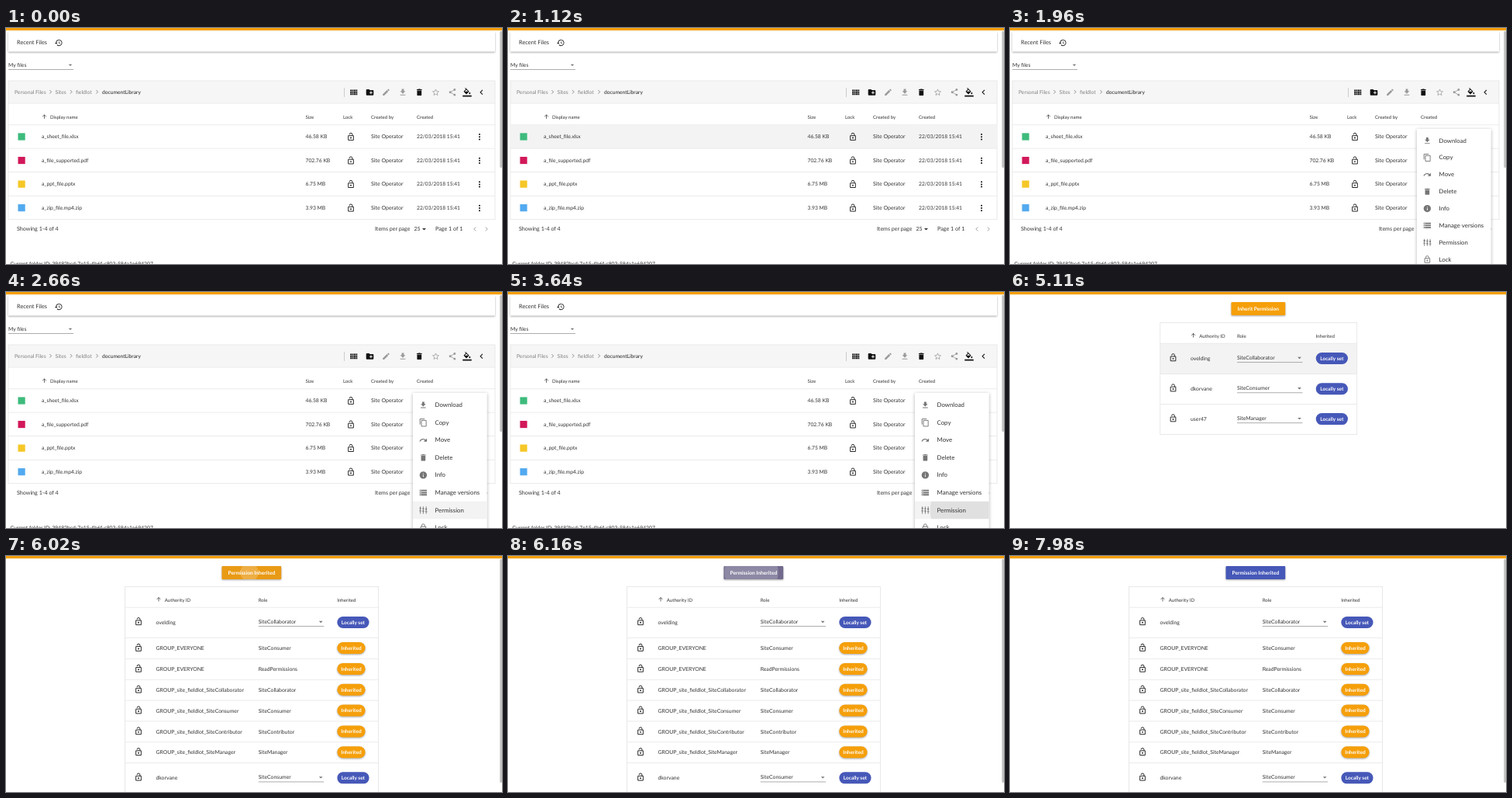
An HTML page for the animation above (8 s loop, 640x304 px).

```html
<!DOCTYPE html>
<html lang="en">
<head>
<meta charset="utf-8">
<title>File permissions</title>
<style>
html, body { margin: 0; width: 100%; height: 100%; overflow: hidden; background: #fff; }
svg { display: block; width: 100%; height: 100%; }
text { font-family: Lato, "Open Sans", sans-serif; text-rendering: geometricPrecision; white-space: pre; }
.raised { filter: drop-shadow(0 1px 1px rgba(0,0,0,.35)); }
.sheet { filter: drop-shadow(0 1px 2px rgba(0,0,0,.3)); }
</style>
</head>
<body>
<svg id="stage" viewBox="0 0 640 304"></svg>
<script>
const LOOP = 8000;
const INK = '#333', SOFT = '#757575', DIM = '#9a9a9a', LINE = '#e6e6e6';
const ORANGE = [245, 159, 10], BLUE = [70, 88, 184];
const rgb = c => `rgb(${c.map(Math.round)})`;

// Icons on a 24 unit grid: f = filled path, s = stroked path
const icons = {
  grid: { f: [5, 10, 15].map(y => [3, 8, 13, 18].map(x => `M${x} ${y}h4v4h-4z`).join('')).join('') },
  folder: { f: 'M20 6h-8l-2-2H4a2 2 0 0 0-2 2v12a2 2 0 0 0 2 2h16a2 2 0 0 0 2-2V8a2 2 0 0 0-2-2zm-1 8h-3v3h-2v-3h-3v-2h3V9h2v3h3z' },
  pencil: { f: 'M3 17.2V21h3.8L17.8 9.9l-3.7-3.7zM20.7 7a1 1 0 0 0 0-1.4l-2.3-2.3a1 1 0 0 0-1.4 0l-1.9 1.8 3.8 3.8z' },
  download: { f: 'M19 9h-4V3H9v6H5l7 7zM5 18v2h14v-2z' },
  bin: { f: 'M6 19a2 2 0 0 0 2 2h8a2 2 0 0 0 2-2V7H6zM19 4h-3.5l-1-1h-5l-1 1H5v2h14z' },
  star: { s: 'M12 4l2.3 5.5 6 .5-4.500 4 1.400 5.800L12 16.700 6.800 19.800l1.400-5.800-4.500-4 6-.5z', w: 1.6 },
  share: { f: 'M15 5a3 3 0 1 0 6 0a3 3 0 1 0-6 0M3 12a3 3 0 1 0 6 0a3 3 0 1 0-6 0M15 19a3 3 0 1 0 6 0a3 3 0 1 0-6 0', s: 'M18 5L6 12l12 7', w: 1.8 },
  bucket: { f: 'M16.600 9L7.600 0 6.200 1.400l2.400 2.400L3.400 9a1.500 1.500 0 0 0 0 2l5.500 5.600a1.500 1.500 0 0 0 2.200 0l5.500-5.600a1.500 1.500 0 0 0 0-2zM5.200 10L10 5.200l4.800 4.800zM19 11.500s-2 2.200-2 3.500a2 2 0 0 0 4 0c0-1.300-2-3.500-2-3.500zM0 20h24v4H0z' },
  left: { s: 'M15 6l-6 6 6 6', w: 2.2 },
  right: { s: 'M9 6l6 6-6 6', w: 2.2 },
  up: { s: 'M12 20V5M5 12l7-7 7 7', w: 2.2 },
  caret: { f: 'M6 9h12l-6 6z' },
  more: { f: [5, 12, 19].map(y => `M9.800 ${y}a2.200 2.200 0 1 0 4.400 0a2.200 2.200 0 1 0-4.400 0`).join('') },
  history: { f: 'M13 3a9 9 0 0 0-9 9H1l4 4 4-4H6a7 7 0 1 1 2 5l-1.400 1.400A9 9 0 1 0 13 3zM12 8v5l4.300 2.500.7-1.200-3.500-2V8z' },
  unlock: { f: 'M10 15a2 2 0 1 0 4 0a2 2 0 1 0-4 0', s: 'M5 9h14v12H5zM8 6a4 4 0 0 1 8 0v3', w: 2 },
  lock: { f: 'M10 15a2 2 0 1 0 4 0a2 2 0 1 0-4 0', s: 'M5 9h14v12H5zM8 9V6a4 4 0 0 1 8 0v3', w: 2 },
  copy: { s: 'M3 17V2h13M7 6h13v16H7z', w: 2 },
  move: { f: 'M18.400 10.600A10.500 10.500 0 0 0 1.500 15.200l2.400.8a8 8 0 0 1 12.700-3.600L13 16h9V7z' },
  info: { f: 'M12 2a10 10 0 1 0 0 20a10 10 0 1 0 0-20zm1 15h-2v-6h2zm0-8h-2V7h2z' },
  versions: { f: [4, 10, 16].map(y => `M2 ${y}h20v4H2zm2 1v2h2v-2z`).join('') },
  sliders: { f: 'M2 5h4v4H2zM10 13h4v4h-4zM18 7h4v4h-4z', s: 'M4 2v20M12 2v20M20 2v20M1 14h6M9 8h6M17 16h6', w: 1.8 }
};

const icon = (name, x, y, color = '#222', size = 11.5) => {
  const { f, s, w } = icons[name];
  return `<g transform="translate(${x} ${y}) scale(${size / 24}) translate(-12 -12)">` +
    (f ? `<path d="${f}" fill="${color}" fill-rule="evenodd"/>` : '') +
    (s ? `<path d="${s}" fill="none" stroke="${color}" stroke-width="${w}"/>` : '') + '</g>';
};
const text = (str, x, y, size = 6.8, color = INK, extra = '') =>
  `<text x="${x}" y="${y}" font-size="${size}" fill="${color}" ${extra}>${str}</text>`;
const rect = (x, y, w, h, fill, extra = '') =>
  `<rect x="${x}" y="${y}" width="${w}" height="${h}" fill="${fill}" ${extra}/>`;
const hline = (x1, x2, y, color = LINE) => rect(x1, y - .4, x2 - x1, .8, color);
const frame = (x, y, w, h) => rect(x, y, w, h, 'none', `stroke="${LINE}" stroke-width=".9"`);
const label = (str, x, y, size = 6.5) =>
  text(str, x, y, size, '#fff', 'font-weight="700" text-anchor="middle"');
const scrollbar = bottom => rect(637.3, 4, 2.7, bottom - 4, '#c1c1c1', 'rx="1.3"');

function libraryPage() {
  let out = rect(3, 5, 628, 25.5, '#fff', 'class="raised"') +
    text('Recent Files', 14, 20.7, 7.4) + icon('history', 68, 19, '#222', 11) +
    text('My files', 3, 50.2) + hline(3, 87, 53.6, '#999') + icon('caret', 83, 47.8, SOFT, 9) +
    rect(3, 68, 628, 29, '#f6f6f6') + frame(3, 68, 628, 178.7) + hline(3, 631, 97);

  [['Personal Files', 11], ['Sites', 63.5], ['fieldlot', 90]].forEach(([s, x]) => out += text(s, x, 84.6, 6.75, '#808080'));
  [57.5, 84, 117.5].forEach(x => out += icon('right', x, 82.3, SOFT, 9));
  out += text('documentLibrary', 124, 84.6, 6.7, '#222') + rect(436.2, 77, .7, 12, '#bbb');

  [['grid', 448.5], ['folder', 469.5], ['pencil', 490.5, DIM], ['download', 512, DIM], ['bin', 533.3],
   ['star', 554.5, DIM], ['share', 576, DIM], ['bucket', 595], ['left', 613.5]]
    .forEach(([n, x, c]) => out += icon(n, x, 82.8, c || '#111'));

  out += icon('up', 49.5, 114.2, '#333', 8);
  [['Display name', 57], ['Size', 386.5], ['Lock', 435], ['Created by', 471], ['Created', 530]]
    .forEach(([s, x]) => out += text(s, x, 116.7, 6.1));
  out += hline(3, 631, 124.8) + rect(3, 125, 628, 30, '#f3f3f3', 'id="rowHover"');

  [['a_sheet_file.xlsx', '46.58 KB', '#3dbb7c'], ['a_file_supported.pdf', '702.76 KB', '#d2185a'],
   ['a_ppt_file.pptx', '6.75 MB', '#f5c727'], ['a_zip_file.mp4.zip', '3.93 MB', '#53aaf0']]
    .forEach(([name, size, color], i) => {
      const y = 139.9 + i * 30.55;
      out += rect(15.5, y - 4.5, 9.2, 9.2, color) + text(name, 46, y + 2.4, 6.75) +
        text(size, 386.5, y + 2.4, 6.75) + icon('unlock', 445, y + .2) +
        text('Site Operator', 471, y + 2.4, 7) + text('22/03/2018 15:41', 530, y + 2.4, 6.7) +
        icon('more', 611, y + .4, '#111', 11) + (i < 3 ? hline(3, 631, y + 15.2) : '');
    });

  return out + text('Showing 1-4 of 4', 14, 261.3, 7.15) + text('Items per page', 476, 261.3, 7.05) +
    text('25', 526.5, 261.3, 7) + icon('caret', 539.5, 259.2, '#333', 10) + text('Page 1 of 1', 554, 261.3, 7.2) +
    icon('left', 605, 259, DIM, 10) + icon('right', 620, 259, DIM, 10) +
    text('Current folder ID: 39482bcd-7e15-4b6f-c803-58da1e694207', 5.500, 305.6, 6.75) + scrollbar(180);
}

const MENU = { x: 525, y: 130, w: 95.7, first: 145.7, step: 22.55 };
const itemTop = i => MENU.first + (i - .5) * MENU.step;

function menuPanel() {
  const items = [['download', 'Download'], ['copy', 'Copy'], ['move', 'Move'], ['bin', 'Delete'], ['info', 'Info'],
    ['versions', 'Manage versions'], ['sliders', 'Permission'], ['lock', 'Lock']];
  return rect(MENU.x, MENU.y, MENU.w, 190, '#fff', 'class="sheet"') +
    rect(MENU.x, 0, MENU.w, MENU.step, '#f3f3f3', 'id="itemHover"') +
    `<clipPath id="itemClip">${rect(MENU.x, itemTop(6), MENU.w, MENU.step, '#000')}</clipPath>` +
    `<g clip-path="url(#itemClip)"><circle id="itemRipple" cx="592" cy="${itemTop(6.5)}" fill="#000" fill-opacity=".08"/></g>` +
    items.map(([n, s], i) => {
      const y = MENU.first + i * MENU.step;
      return icon(n, 538.4, y, SOFT, 11.3) + text(s, 553.5, y + 2.5, 7.85);
    }).join('');
}

// rows: [name, role, height, inherited]
function permissionTable(x, w, col, rows, hoverId) {
  let y = 66.2, body = '', total = rows.reduce((sum, r) => sum + r[2], y);
  rows.forEach(([name, role, h, inherited], i) => {
    const mid = y + h / 2 - .1;
    if (hoverId && !i) body += rect(x, y, w, h, '#f3f3f3', `id="${hoverId}"`);
    body += hline(x, x + w, y) + icon('unlock', col.lock, mid - (inherited ? .8 : 1.4)) +
      text(name, col.name, mid + 2.3, 6.85) + text(role, col.role, mid + (inherited ? 2.3 : 1.1), 6.85);
    if (!inherited) body += hline(col.role, col.role + 84.500, mid + 4.800, '#999') + icon('caret', col.role + 80.5, mid - .8, SOFT, 9.5);
    const cw = inherited ? 36.3 : 41.3;
    body += rect(col.chip, mid - 7.8, cw, 15, rgb(inherited ? ORANGE : BLUE), `rx="7.5" ${inherited ? 'class="raised"' : ''}`) +
      label(inherited ? 'Inherited' : 'Locally set', col.chip + cw / 2, mid + 2);
    y += h;
  });
  return body + frame(x, 39.6, w, total - 39.6) + icon('up', col.name + 3.5, 55.8, '#333', 8) +
    text('Authority ID', col.name + 11.3, 58.5, 6.1) + text('Role', col.role, 58.5, 6.1) + text('Inherited', col.chip, 58.5, 6.1);
}

const topBar = rect(0, 0, 640, 3.2, rgb(ORANGE));
const [ann, ben, guest] = ['ovelding', 'dkorvane', 'user47'];
const site = 'GROUP_site_fieldlot_';

const localTable = permissionTable(193.700, 254, { lock: 210.5, name: 233, role: 293, chip: 394.700 }, [
  [ann, 'SiteCollaborator', 39.5], [ben, 'SiteConsumer', 38.8], [guest, 'SiteManager', 39]
], 'userHover');

const groups = [['GROUP_EVERYONE', 'SiteConsumer'], ['GROUP_EVERYONE', 'ReadPermissions'],
  ...['Collaborator', 'Consumer', 'Contributor', 'Manager'].map(r => [site + 'Site' + r, 'Site' + r])];
const fullTable = permissionTable(153.5, 327, { lock: 171, name: 193.5, role: 325.700, chip: 427.3 }, [
  [ann, 'SiteCollaborator', 39.300], ...groups.map(g => [...g, 26.85, true]), [ben, 'SiteConsumer', 39.300]
]) + scrollbar(292);

const button = `<g id="button">
  <rect id="buttonBox" y="13" height="17" rx="1" class="raised"/>
  <clipPath id="buttonClip"><rect id="buttonMask" y="13" height="17" rx="1"/></clipPath>
  <g clip-path="url(#buttonClip)"><circle id="buttonRipple" cx="314" cy="21" fill="#fff"/></g>
  <text id="buttonText" y="23.8" font-size="6.65" font-weight="700" fill="#fff" text-anchor="middle"></text></g>`;

document.getElementById('stage').innerHTML = rect(0, 0, 640, 304, '#fff') +
  `<g id="library">${libraryPage()}</g><g id="menu">${menuPanel()}</g>` +
  `<g id="local">${localTable}</g><g id="full">${fullTable}</g>` + button + topBar;

const el = {};
document.querySelectorAll('svg [id]').forEach(n => el[n.id] = n);
const set = (id, attrs) => { for (const k in attrs) el[id].setAttribute(k, attrs[k]); };
const show = (id, on) => set(id, { display: on ? 'inline' : 'none' });
const clamp = v => Math.min(1, Math.max(0, v));
const span = (t, from, length) => clamp((t - from) / length);
const easeOut = p => 1 - (1 - p) ** 3;

const OPEN = 1720, CLICK = 3500, SWAP = 3750, INHERIT = 6012;

function render(t) {
  const onLibrary = t < SWAP, inherited = t >= INHERIT;
  show('library', onLibrary);
  show('menu', onLibrary && t >= OPEN);
  show('local', !onLibrary && !inherited);
  show('full', inherited);
  show('button', !onLibrary);
  show('rowHover', t >= 1120 && t < 1700);
  show('userHover', t < 5960);

  const stretch = .5 + .5 * easeOut(span(t, OPEN, 400));
  set('menu', {
    transform: `translate(0 ${MENU.y}) scale(1 ${stretch}) translate(0 ${-MENU.y})`,
    opacity: Math.min(span(t, OPEN - 40, 120), 1 - span(t, 3660, 90))
  });
  show('itemHover', t >= 2100);
  set('itemHover', { y: itemTop(Math.round(6 * span(t, 2100, 280))) });
  set('itemRipple', { r: 84 * span(t, CLICK, 250) });

  const tint = easeOut(span(t, INHERIT, 400));
  const x = inherited ? 278.5 : 285.5, width = 355.2 - x;
  set('buttonBox', { x, width, fill: rgb(ORANGE.map((c, i) => c + (BLUE[i] - c) * tint)) });
  set('buttonMask', { x, width });
  set('buttonRipple', { r: 34.500 * span(t, 5950, 210) + 15 * span(t, 6160, 150), opacity: .2 * (1 - span(t, 6300, 400)) });
  set('buttonText', { x: x + width / 2 });
  el.buttonText.textContent = inherited ? 'Permission Inherited' : 'Inherit Permission';
}

const start = performance.now();
function tick() {
  render((performance.now() - start) % LOOP);
  requestAnimationFrame(tick);
}
tick();
</script>
</body>
</html>
```
